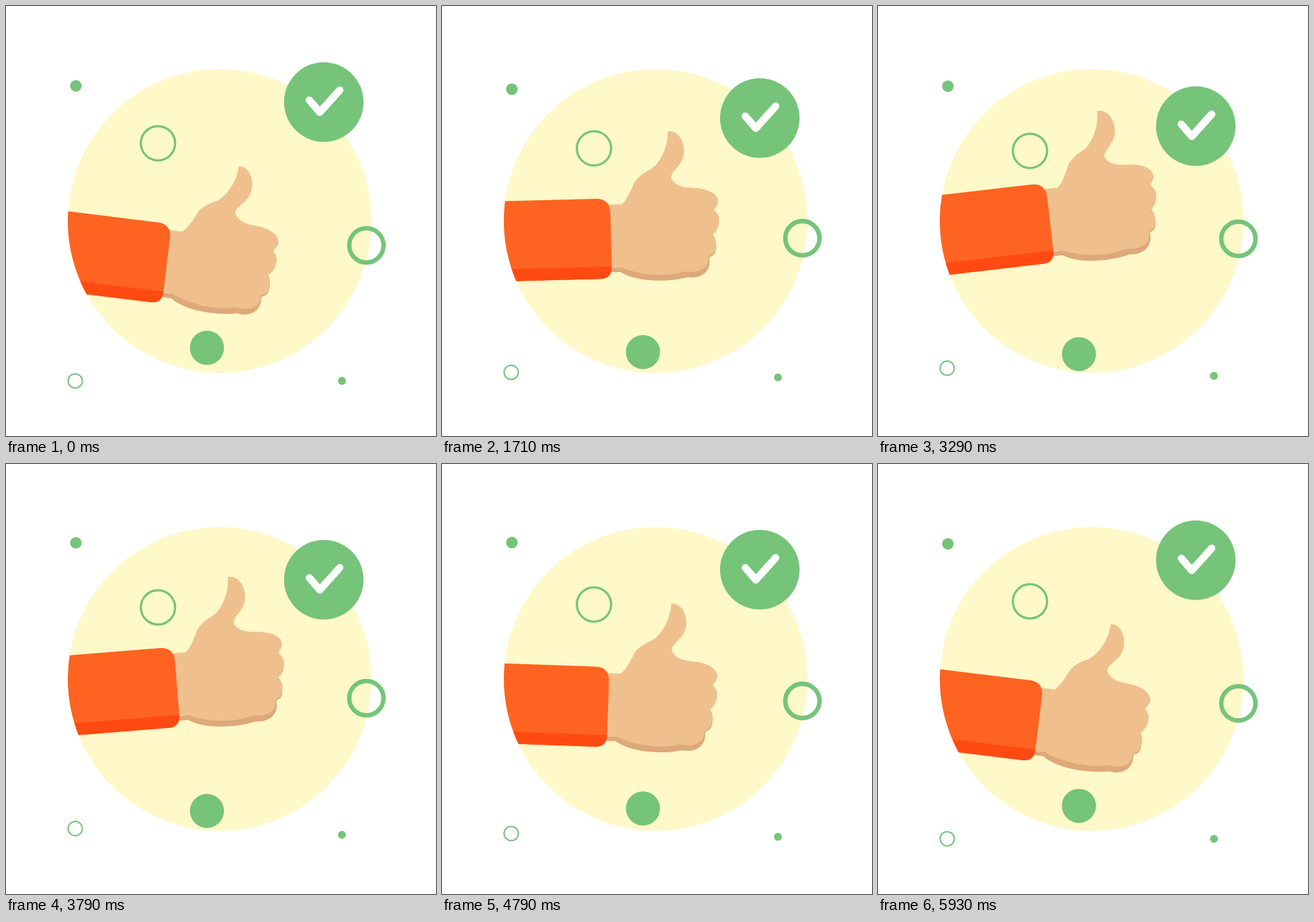
These frames come from a looping animation (640x640 px, 6000 ms). An HTML page:

```html
<!DOCTYPE html>
<html lang="en">
<head>
<meta charset="utf-8">
<title>Thumbs up</title>
<style>
  html, body { margin: 0; width: 100%; height: 100%; overflow: hidden; background: #fff; }
  svg { display: block; width: 100%; height: 100%; }
  .dot { fill: #75c47a; }
  .ring { fill: none; stroke: #75c47a; }
</style>
</head>
<body>
<svg viewBox="0 0 640 640">
  <defs>
    <clipPath id="disc"><circle cx="318" cy="320" r="226"/></clipPath>
    <clipPath id="cuff">
      <path id="sleeve" d="M-60 293.1H228.3Q249.8 293.1 249.8 314.6V394.5Q249.8 412.5 232 412.5H-60Z"/>
    </clipPath>
  </defs>
  <circle cx="318" cy="320" r="226" fill="#fff8c8"/>
  <g clip-path="url(#disc)">
    <g id="arm">
      <path fill="#dea97a" d="M225 426L247 428L390 400C393 406 393.5 411 392.7 416
        C391 426 389 431 382.5 432C379 433 380 436 379.5 440
        C377 452 368 459.3 354 459.3C349 459.3 346 457.5 342.5 457.6
        C316 460.5 269 455 246 435.2L225 432.6Z"/>
      <path fill="#efc08d" d="M225 331L262.5 335.8C270 331 277 321 283 311
        C289 300 301 294.5 313 290.5C328 284 344 261 346.3 238.7
        C357 238 366 249 366.3 263C367 277 361 286 353 293
        C346 299 341.5 303 341 307.5C344 318 354 324 369 326.5
        C392 330.5 405.5 340 405.4 351.5C405 358.5 399.5 360.5 397.8 365
        C399.5 368.5 402.8 371 402.9 377C402.6 389 396 397 389.8 400.5
        C388.8 404 393 405 392.8 413C391.5 423 388 429 383 429.8
        C378 430.5 379 434 378 437.5C375.5 446 368 451 355 450.8
        C349 450.7 344 448.2 338.5 448.4C317 452.5 277 446 247 428L225 425Z"/>
      <g transform="rotate(7 -8.5 283)">
        <use href="#sleeve" fill="#ff6321"/>
        <rect x="-60" y="394.3" width="320" height="30" fill="#ff4b12" clip-path="url(#cuff)"/>
      </g>
    </g>
  </g>
  <circle id="topDot" class="dot" cx="104" r="8.6"/>
  <circle id="topRing" class="ring" cx="226.2" r="25.5" stroke-width="3.3"/>
  <circle id="sideRing" class="ring" cx="536.4" r="25.5" stroke-width="6.6"/>
  <circle id="lowDot" class="dot" cx="299.1" r="25.4"/>
  <circle id="lowRing" class="ring" cx="103" r="10.6" stroke-width="2"/>
  <circle id="cornerDot" class="dot" cx="500" r="5.9"/>
  <g id="badge">
    <circle class="dot" cx="473" r="59.2"/>
    <path d="M451.5 -2.8L467 15.2L496.7 -17.8" fill="none" stroke="#fff" stroke-width="11"
      stroke-linecap="round" stroke-linejoin="round"/>
  </g>
</svg>
<script>
const LOOP = 6000;
const SWING = 14;
const byId = id => document.getElementById(id);

// Symmetric cubic Bezier easing (k, 0, 1-k, 1), solved by bisection.
function ease(u, k) {
  let lo = 0, hi = 1;
  for (let i = 0; i < 24; i++) {
    const s = (lo + hi) / 2, r = 1 - s;
    const x = 3 * r * r * s * k + 3 * r * s * s * (1 - k) + s * s * s;
    if (x < u) lo = s; else hi = s;
  }
  return lo * lo * (3 - 2 * lo);
}

// keys: [time, value] pairs; the value returns to the first one at the loop end.
function track(keys, k) {
  const all = [...keys, [LOOP, keys[0][1]]];
  return t => {
    const i = all.findIndex(key => key[0] > t);
    const [t0, v0] = all[i - 1], [t1, v1] = all[i];
    return v0 + (v1 - v0) * ease((t - t0) / (t1 - t0), k);
  };
}

const SOFT = 1 / 3, FIRM = 1 / 6, BRISK = 0.08;
const armAngle = track([[0, 0], [3000, -SWING]], SOFT);
const badgeY = track([[0, 143], [2890, 182]], FIRM);
const floaters = {
  topDot: track([[0, 118.8], [2000, 124.1], [4250, 116.4]], SOFT),
  topRing: track([[0, 204.3], [2880, 216.9]], BRISK),
  sideRing: track([[0, 356.3], [2200, 343.3]], FIRM),
  lowDot: track([[0, 508.7], [2880, 519.3]], BRISK),
  lowRing: track([[0, 558], [2880, 536.8]], BRISK),
  cornerDot: track([[0, 558], [2880, 549.6]], BRISK)
};

function draw(t) {
  byId('arm').setAttribute('transform', `rotate(${armAngle(t)} -8.5 283)`);
  byId('badge').setAttribute('transform', `translate(0 ${badgeY(t)})`);
  for (const id in floaters) byId(id).setAttribute('cy', floaters[id](t));
}

const start = performance.now();
function tick() {
  draw((performance.now() - start) % LOOP);
  requestAnimationFrame(tick);
}
tick();
</script>
</body>
</html>
```
